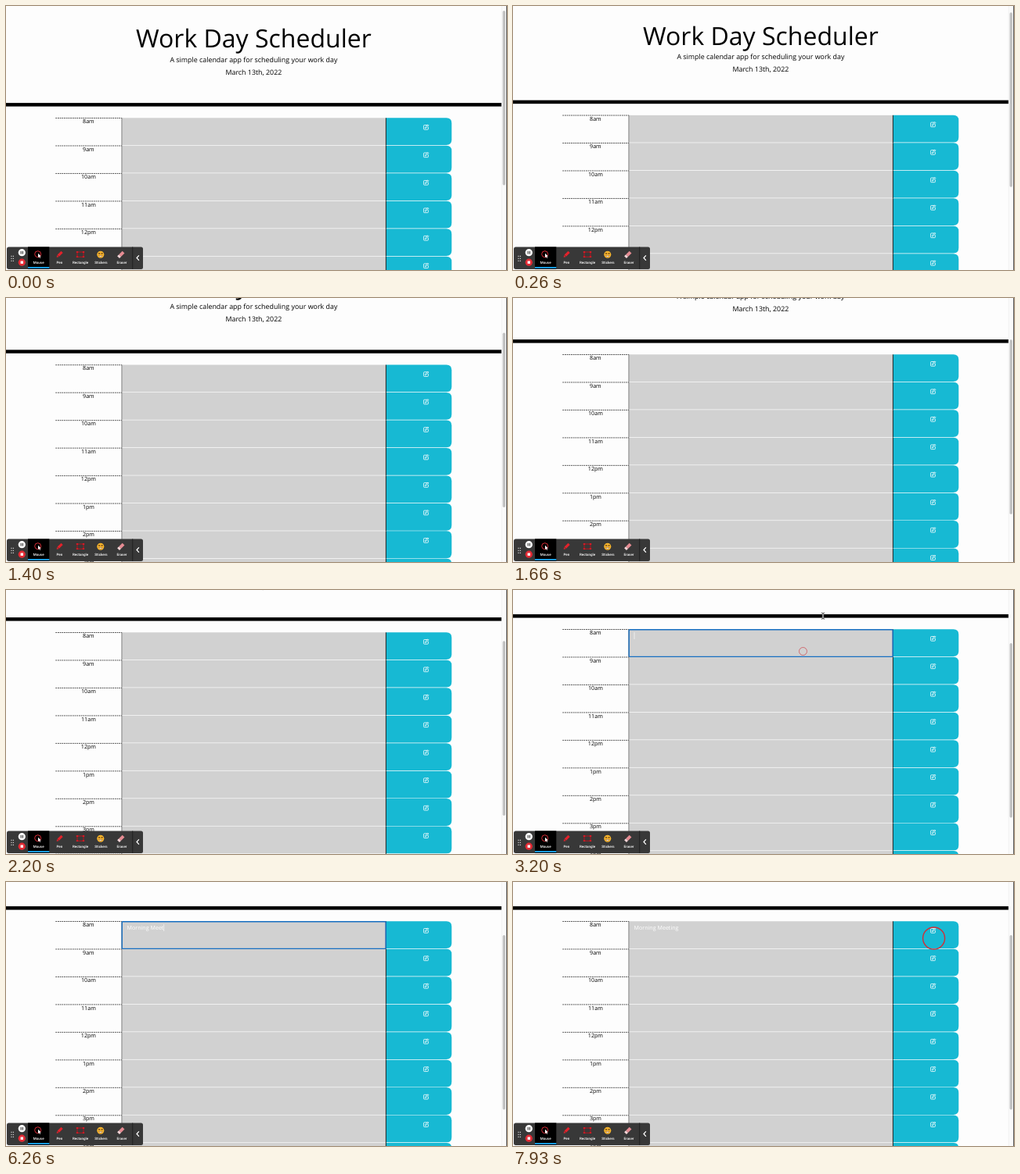
Recreate the animation shown at these times as an HTML page. Size 640 px wide and 338 px high, loop 8 s.

```html
<!DOCTYPE html>
<html lang="en">
<head>
<meta charset="utf-8">
<title>Work Day Scheduler</title>
<style>
  html, body { margin: 0; width: 100%; height: 100%; overflow: hidden; background: #fdfdfd; }
  svg { display: block; width: 100vw; height: 100vh; }
  text { font-family: "Open Sans", "Noto Sans", sans-serif; text-rendering: geometricPrecision; white-space: pre; }
  .mid { text-anchor: middle; }
  .hour { font-size: 7.11px; }
  .lead { font-size: 8.89px; }
  .title { font-size: 32px; }
  .tool { font: 500 4.5px Roboto, sans-serif; fill: #fff; }
  .line { fill: none; stroke-linecap: round; stroke-linejoin: round; }
</style>
</head>
<body>
<svg viewBox="0 0 640 338">
  <defs>
    <g id="edit" class="line" stroke="#fff" stroke-width=".8">
      <path d="M1.2 -2.7H-2.2Q-3 -2.7 -3 -1.9V2.2Q-3 3 -2.2 3H2Q2.8 3 2.8 2.2V0"/>
      <path d="M-1 1L-.7 -.3L2.4 -3.3L3.3 -2.4L.3 .7Z"/>
    </g>
    <path id="arrow" d="M0 0V5.2L1.3 4.1L2.2 6L3.1 5.6L2.2 3.7H3.8Z" fill="#fff"/>
  </defs>
  <rect width="640" height="338" fill="#fdfdfd"/>

  <g id="page">
    <g class="mid">
      <text class="title" x="316.4" y="53.2">Work Day Scheduler</text>
      <text class="lead" x="316.4" y="71.8">A simple calendar app for scheduling your work day</text>
      <text class="lead" x="316.4" y="87.7">March 13th, 2022</text>
    </g>
    <rect y="124.1" width="633" height="4.5"/>
    <g id="rows"></g>
    <rect id="focus" x="148.2" y="143.8" width="337" height="34.6" rx="1" fill="none" stroke="#176fc1" stroke-width="1.4"/>
    <text id="entry" class="hour" x="154.6" y="154" fill="#fff"></text>
    <rect id="caret" y="147" width=".6" height="9" fill="#fff"/>
  </g>

  <rect x="633" width="7" height="338" fill="#fafafa"/>
  <path d="M633.2 0V338" stroke="#e6e6e6" stroke-width=".5"/>
  <rect id="thumb" x="634.5" y="6" width="3.4" height="223.5" rx="1.7" fill="#c1c1c1"/>
  <path d="M639.5 0V338" stroke="#333" stroke-width=".8"/>

  <g id="toolbar">
    <rect x="1" y="308.4" width="174" height="28.6" rx="2.5" fill="#383838"/>
    <rect x="28" y="308.4" width="27.3" height="28.6" fill="#000"/>
    <rect x="28" y="334" width="27.3" height="1.9" fill="#159fe6"/>
    <path d="M161.7 308.4V337" stroke="#1c1c1c" stroke-width=".8"/>
    <path d="M7 319.8V327M9.4 319.8V327" stroke="#ddd" stroke-width="1.1" stroke-dasharray="1.1 1.9"/>
    <circle cx="20.3" cy="315.7" r="4.6" fill="#fff"/>
    <path d="M19.2 313.8V317.6M21.4 313.8V317.6" stroke="#222" stroke-width="1"/>
    <circle cx="20.3" cy="328.2" r="4.6" fill="#e32b35"/>
    <rect x="18.6" y="326.5" width="3.4" height="3.4" fill="#fff"/>
    <circle cx="40.7" cy="317.7" r="4" fill="none" stroke="#d92c35" stroke-width="1"/>
    <use href="#arrow" x="41" y="316.8"/>
    <g transform="translate(68.2 318.3) rotate(45)">
      <path d="M-1.6 -4.8H1.6V2H-1.6Z" fill="#e3222b"/>
      <path d="M-1.6 2.6H1.6L0 5Z" fill="#e3222b"/>
    </g>
    <rect x="91" y="315" width="8" height="6.2" fill="none" stroke="#b5131d" stroke-width="1"/>
    <path d="M89.8 315H92.2M97.8 315H100.2M89.8 321.2H92.2M97.8 321.2H100.2" stroke="#d41a25" stroke-width="1.8"/>
    <circle cx="120.8" cy="318.3" r="4.5" fill="#f7b52c"/>
    <path d="M118 316.9H120.2M121.5 316.9H123.7" stroke="#5a3510" stroke-width="1.3"/>
    <path d="M118.4 319.4Q120.8 323.2 123.2 319.4Z" fill="#fff" stroke="#8a4b15" stroke-width=".5"/>
    <g transform="translate(146.8 318.3) rotate(45)">
      <rect x="-2" y="-4.6" width="4" height="6.4" fill="#e58b93"/>
      <rect x="-2" y="1.8" width="4" height="2.8" fill="#f5d5d8"/>
    </g>
    <g class="mid" id="labels"></g>
    <path class="line" d="M169.6 319.7L167 322.5L169.6 325.3" stroke="#fff" stroke-width="1.2"/>
  </g>

  <circle id="ripple" fill="none" stroke="#cf2f38"/>
  <g id="beam" class="line">
    <path d="M394.3 29.2Q396 29.2 396 30.5Q396 29.2 397.7 29.2M396 30.5V36M394.3 37.2Q396 37.2 396 36Q396 37.2 397.7 37.2" stroke="#fff" stroke-width="1.7"/>
    <path d="M394.3 29.2Q396 29.2 396 30.5Q396 29.2 397.7 29.2M396 30.5V36M394.3 37.2Q396 37.2 396 36Q396 37.2 397.7 37.2" stroke="#222" stroke-width=".8"/>
  </g>
</svg>
<script>
const LOOP = 8000, ROW = 35.47, TOP = 143.3;
const MESSAGE = 'Morning Meeting';
const TYPE_START = 4330, TYPE_STEP = 165;
const FOCUS = 3130, BLUR = 7800;
const SCROLL = [[0, 0], [300, 4], [600, 15], [1130, 44], [1660, 71], [2050, 87], [2500, 93]];
const CLICKS = [{ at: 3130, x: 370.5, y: 78.5 }, { at: 7790, x: 537.6, y: 72 }];
const RADIUS = [[0, 1], [70, 5], [140, 14], [220, 15]];

const $ = id => document.getElementById(id);
const el = Object.fromEntries(
  ['page', 'rows', 'focus', 'entry', 'caret', 'thumb', 'labels', 'ripple', 'beam'].map(id => [id, $(id)]));

const hourName = h => (h > 12 ? h - 12 : h) + (h < 12 ? 'am' : 'pm');

function row(i) {
  const y = TOP + i * ROW, h = ROW;
  return `<g transform="translate(0 ${y})">
    <path d="M63.3 .2H148" stroke="#222" stroke-width=".8" stroke-dasharray="1.8 .9"/>
    <text class="hour mid" x="105.4" y="6.9">${hourName(8 + i)}</text>
    <rect x="148" width="337.5" height="${h - .7}" fill="#d1d1d1"/>
    <path d="M485.5 0H562.6Q569.3 0 569.3 6.7V${h - 7.4}Q569.3 ${h - .7} 562.6 ${h - .7}H485.5Z" fill="#17b9d3"/>
    <path d="M147.9 0V${h}" stroke="#555" stroke-width=".7"/>
    <path d="M485.4 0V${h}" stroke="#111" stroke-width=".9"/>
    <use href="#edit" x="536.6" y="11.9"/>
  </g>`;
}

el.rows.innerHTML = Array.from({ length: 10 }, (_, i) => row(i)).join('');
el.labels.innerHTML = [['Mouse', 41.7], ['Pen', 68.3], ['Rectangle', 95], ['Stickers', 121.5], ['Eraser', 148]]
  .map(([name, x]) => `<text class="tool" x="${x}" y="329.8">${name}</text>`).join('');

function track(steps, t) {
  const i = steps.findIndex(step => step[0] > t);
  if (i < 0) return steps[steps.length - 1][1];
  if (i === 0) return steps[0][1];
  const [t0, a] = steps[i - 1], [t1, b] = steps[i];
  return a + (b - a) * (t - t0) / (t1 - t0);
}

const show = (node, on) => node.setAttribute('visibility', on ? 'visible' : 'hidden');

function drawRipple(t) {
  const click = CLICKS.find(c => t >= c.at && t < c.at + 400);
  show(el.ripple, click);
  if (!click) return;
  const age = t - click.at, r = track(RADIUS, age);
  const fade = track([[0, .4], [70, .65], [140, 1], [220, 1], [400, 0]], age);
  const attrs = { cx: click.x, cy: click.y, r, 'stroke-width': .7 + r * .05, opacity: fade };
  for (const key in attrs) el.ripple.setAttribute(key, attrs[key]);
}

function drawEntry(t) {
  const typed = Math.floor((t - TYPE_START) / TYPE_STEP) + 1;
  const count = Math.max(0, Math.min(MESSAGE.length, typed));
  const text = MESSAGE.slice(0, count);
  if (el.entry.textContent !== text) el.entry.textContent = text;
  const focused = t >= FOCUS && t < BLUR;
  const typing = count > 0 && count < MESSAGE.length;
  const blinkFrom = count ? TYPE_START + MESSAGE.length * TYPE_STEP : FOCUS;
  show(el.focus, focused);
  show(el.caret, focused && (typing || Math.floor((t - blinkFrom) / 500) % 2 === 0));
  el.caret.setAttribute('x', 154.7 + (count ? el.entry.getComputedTextLength() : 0));
}

function draw(now) {
  const t = now % LOOP;
  const scroll = track(SCROLL, t);
  el.page.setAttribute('transform', `translate(0 ${-scroll})`);
  el.thumb.setAttribute('y', 6 + scroll * .667);
  show(el.beam, t >= 3060 && t < 4900);
  drawEntry(t);
  drawRipple(t);
}

let start;
function tick(now) {
  start ??= now;
  draw(now - start);
  requestAnimationFrame(tick);
}
draw(0);
requestAnimationFrame(tick);
</script>
</body>
</html>
```
